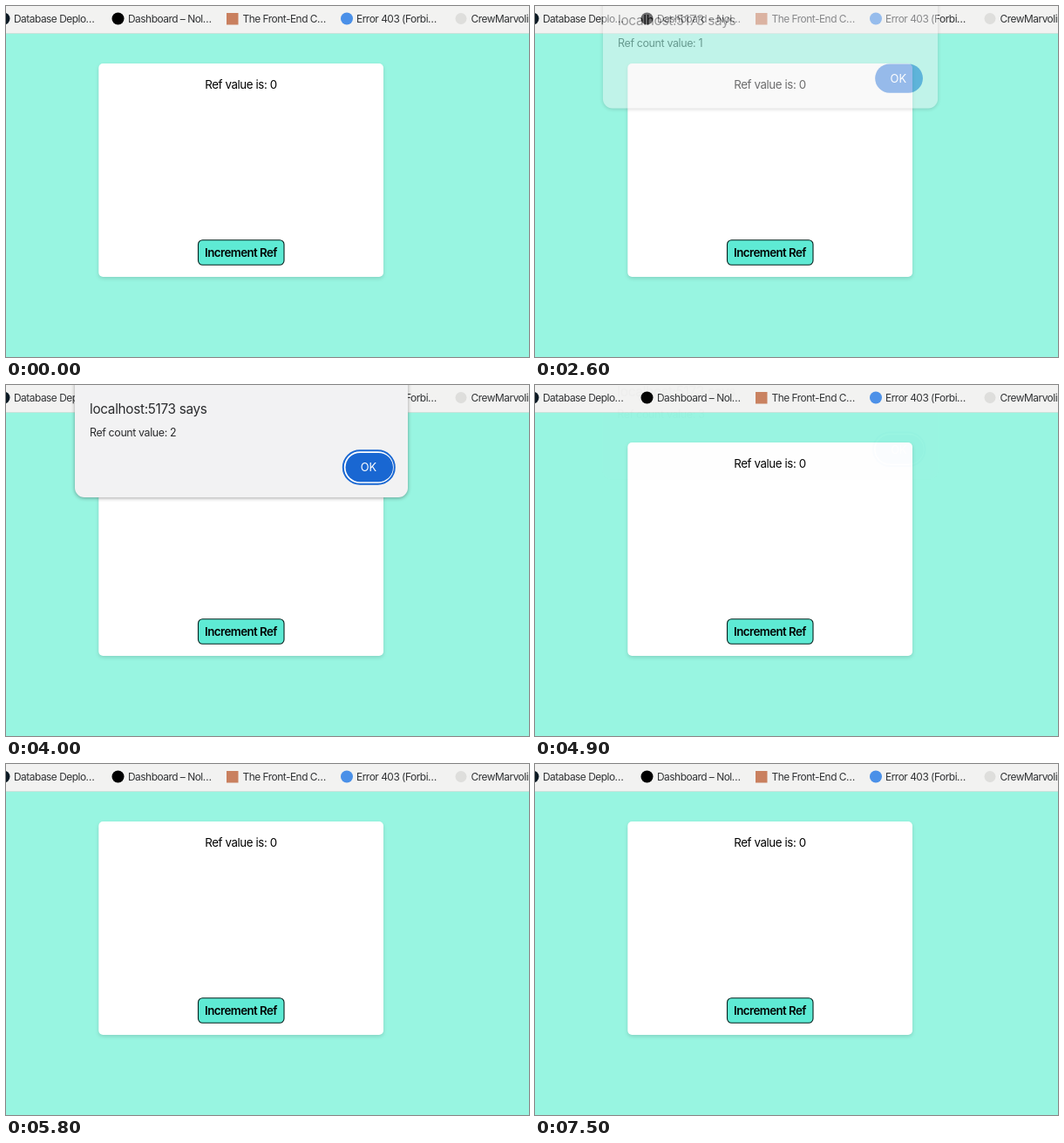
An HTML page that plays this animation: 600x403 px, repeating every 8600 ms.

```html
<!DOCTYPE html>
<html lang="en">
<head>
<meta charset="utf-8">
<title>Ref counter</title>
<style>
  html, body { margin: 0; width: 100%; height: 100%; overflow: hidden; background: #98f5e1; }
  svg { display: block; width: 600px; height: 403px; }
  text { font-family: Inter, "Open Sans", sans-serif; fill: #000; }
  .tabs text { font-size: 11.9px; letter-spacing: -.48px; fill: #303234; }
  .page text { font-size: 13.3px; letter-spacing: -.4px; text-anchor: middle; }
  .page .label { font-weight: 600; letter-spacing: -.55px; }
  .card { fill: #fff; filter: drop-shadow(0 2px 2px rgba(0, 0, 0, .13)); }
  .button { fill: #5eead4; stroke: #06211d; stroke-width: 1.1; }
  .panel { fill: #f2f2f3; filter: drop-shadow(0 1px 2px rgba(0, 0, 0, .35)); }
  .title { font-size: 15.3px; letter-spacing: -.3px; fill: #2a2b2d; }
  .message { font-size: 12.4px; letter-spacing: -.37px; fill: #2a2b2d; }
  .ok { fill: #1967d2; }
  #ring { fill: #fff; stroke: #1967d2; stroke-width: 2; }
  .okLabel { font-size: 12.8px; text-anchor: middle; fill: #fff; }
</style>
</head>
<body>
<svg viewBox="0 0 600 403">
  <rect width="600" height="403" fill="#98f5e1"/>

  <g class="tabs">
    <rect width="600" height="31" fill="#f2f2f1"/>
    <rect y="31" width="600" height="1" fill="#c9e3db"/>
    <circle cx="-2.5" cy="14.5" r="7" fill="#0c1a24"/>
    <circle cx="128.5" cy="14.5" r="7" fill="#000"/>
    <rect x="253" y="8" width="13.5" height="13.5" fill="#c9805f"/>
    <circle cx="391" cy="14.5" r="7" fill="#4a90e8"/>
    <circle cx="522" cy="14.5" r="6.5" fill="#dededc"/>
    <text x="9" y="18.5">Database Deplo…</text>
    <text x="140" y="18.5">Dashboard – Nol…</text>
    <text x="271.5" y="18.5">The Front-End C…</text>
    <text x="402" y="18.5">Error 403 (Forbi…</text>
    <text x="533.5" y="18.5">CrewMarvolin</text>
  </g>

  <g class="page">
    <rect class="card" x="106.3" y="66" width="326.7" height="245" rx="5"/>
    <text x="269.5" y="94.5">Ref value is: 0</text>
    <rect class="button" x="220.5" y="268.7" width="98.5" height="28.6" rx="5"/>
    <text class="label" x="269.5" y="287.5">Increment Ref</text>
  </g>

  <g id="dialog" visibility="hidden">
    <rect class="panel" x="79" y="-40" width="382" height="169" rx="11"/>
    <text class="title" x="96" y="33.3">localhost:5173 says</text>
    <text class="message" x="96" y="58.7">Ref count value: <tspan id="count">1</tspan></text>
    <rect id="ring" x="386.8" y="75.2" width="59" height="38.6" rx="19.3"/>
    <rect class="ok" x="389.5" y="78" width="54.5" height="33.2" rx="16.6"/>
    <text class="okLabel" x="416" y="99.3">OK</text>
  </g>
</svg>
<script>
  const LOOP = 8600, STEP = 100, RISE = 21, GROW = .01, CENTER = 270;
  const alerts = [[600, 2300], [3500, 4000], [4900, 5300], [6300, 6700]];
  const fadeIn = [.015, .6, 1];
  const fadeOut = [1, 1, .8, .45, 0];

  const [dialog, ring, count] = ['dialog', 'ring', 'count'].map(id => document.getElementById(id));
  const at = (list, ms) => list[Math.min(Math.floor(ms / STEP), list.length - 1)];

  function draw(now) {
    const t = now % LOOP;
    const index = alerts.findLastIndex(([open]) => t >= open);
    let alpha = 0;
    if (index >= 0) {
      const [open, close] = alerts[index];
      alpha = t < close ? at(fadeIn, t - open) : at(fadeOut, t - close);
      count.textContent = index + 1;
      ring.setAttribute('visibility', t < close + STEP ? 'inherit' : 'hidden');
    }
    const hidden = 1 - alpha;
    const scale = 1 + GROW * hidden;
    dialog.setAttribute('visibility', alpha ? 'visible' : 'hidden');
    dialog.setAttribute('opacity', alpha);
    dialog.setAttribute('transform',
      `translate(${CENTER * (1 - scale)} ${-RISE * hidden}) scale(${scale} 1)`);
    requestAnimationFrame(draw);
  }
  requestAnimationFrame(draw);
</script>
</body>
</html>
```
